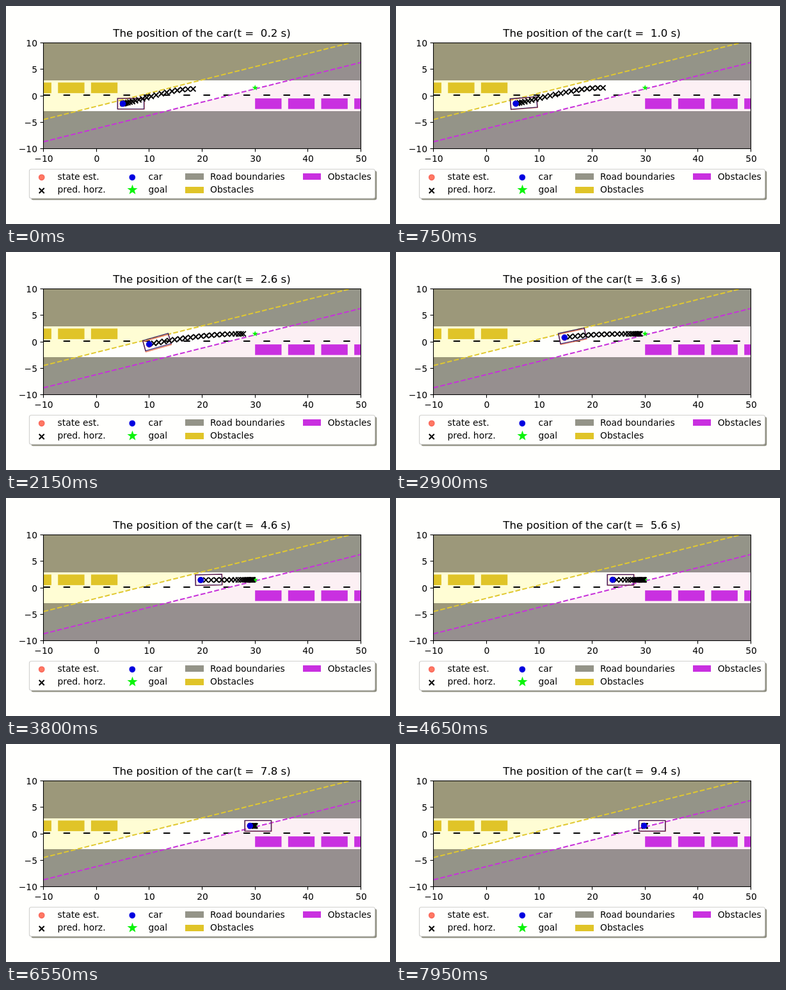
An HTML page with a canvas that plays this animation: 600 by 340 pixels, repeating every 8 s.

```html
<!DOCTYPE html>
<html lang="en">
<head>
<meta charset="utf-8">
<title>Position of the car</title>
<style>
  html, body { margin: 0; width: 100%; height: 100%; overflow: hidden; background: #fffffd; }
  canvas { display: block; }
</style>
</head>
<body>
<canvas id="stage" width="600" height="340"></canvas>
<script>
const ctx = document.getElementById('stage').getContext('2d');
const LOOP = 8000, TICK = 50, HOLD = 170, DT = 0.2, HORIZON = 20;
const LEFT = 58.5, MID = 140, SCALE_X = 8.267, SCALE_Y = 8.25;
const GOAL = 30, LANE = 1.5, CRUISE = 5, ROAD_EDGE = 2.91;
const BLUE = '#0000e0', CORAL = '#ff7862', GREEN = '#08f408';
const YELLOW = '#e0c428', MAGENTA = '#c930e0', ROAD = '#949488', PAPER = '#fffffd';

const px = x => LEFT + (x + 10) * SCALE_X;
const py = y => MID - y * SCALE_Y;
const upperLine = x => 0.25 * x - 2;
const lowerLine = x => 0.25 * x - 6.2;

// Cubic Hermite curve through knots [u, value, slope].
function curve(knots, u) {
  if (u <= knots[0][0]) return knots[0][1];
  for (let i = 1; i < knots.length; i++) {
    const [a, p, m] = knots[i - 1], [b, q, n] = knots[i];
    if (u > b) continue;
    const w = b - a, s = (u - a) / w, r = 1 - s;
    return p * (1 + 2 * s) * r * r + m * w * s * r * r + q * s * s * (3 - 2 * s) - n * w * s * s * r;
  }
  return knots[knots.length - 1][1];
}
const lateral = x => curve([[5, -1.5, 0], [7.25, -1.25, 0.24], [14.75, 0.8, 0.17], [21, LANE, 0]], x);
const heading = x => curve([[5, 0, 0.15], [7.25, 0.23, 0.03], [14.75, 0.21, -0.03], [21.5, 0, 0]], x);

// States after each time step: accelerate to cruising speed, then brake into the goal.
function drive(x, v, accel, braking, steps) {
  const states = [{ x, v }], h = DT / 10;
  for (let i = 1; i <= steps; i++) {
    for (let k = 0; k < 10; k++) {
      v = Math.min(CRUISE, v + accel * h, braking(Math.max(0, GOAL - x)));
      x += v * h;
    }
    states.push({ x, v });
  }
  return states;
}
const track = drive(5, 0, 1.72, rest => Math.min(1.45 * Math.sqrt(rest), rest), 50);

function predict({ x, v }) {
  const plan = drive(x, v, 1.85, rest => 0.85 * rest, HORIZON).slice(1);
  const y = lateral(x), end = plan[HORIZON - 1].x;
  const slope = 0.2 * Math.min(1, LANE - y);
  const target = Math.min(LANE, -1.5 + 0.21 * (end - 5));
  return plan.map(p => [p.x, curve([[x, y, slope], [end, target, 0]], p.x)]);
}

function fillRect(x0, y0, x1, y1, color) {
  ctx.fillStyle = color;
  ctx.fillRect(x0, y0, x1 - x0, y1 - y0);
}

function polygon(points) {
  ctx.beginPath();
  points.forEach(([x, y]) => ctx.lineTo(x, y));
  ctx.closePath();
}

function line(x0, y0, x1, y1, color, width, dash = []) {
  ctx.strokeStyle = color;
  ctx.lineWidth = width;
  ctx.setLineDash(dash);
  ctx.beginPath();
  ctx.moveTo(x0, y0);
  ctx.lineTo(x1, y1);
  ctx.stroke();
  ctx.setLineDash([]);
}

function text(str, x, y, align = 'left', size = 13.89) {
  ctx.font = size + 'px "DejaVu Sans", sans-serif';
  ctx.textAlign = align;
  ctx.fillStyle = '#000';
  ctx.fillText(str, x, y);
}

function dot(x, y, fill, edge) {
  ctx.beginPath();
  ctx.arc(x, y, 4.2, 0, 7);
  ctx.fillStyle = fill;
  ctx.fill();
  ctx.strokeStyle = edge;
  ctx.lineWidth = 1.3;
  ctx.stroke();
}

function cross(x, y) {
  line(x - 4, y - 4, x + 4, y + 4, '#000', 2);
  line(x - 4, y + 4, x + 4, y - 4, '#000', 2);
}

function star(x, y, radius) {
  polygon(Array.from({ length: 10 }, (_, i) => {
    const r = i % 2 ? radius * 0.4 : radius, a = i * Math.PI / 5;
    return [x + r * Math.sin(a), y - r * Math.cos(a)];
  }));
  ctx.fillStyle = GREEN;
  ctx.fill();
}

function carBox(x, y, angle, color, width) {
  const c = Math.cos(angle), s = Math.sin(angle);
  polygon([[-1, -1], [4, -1], [4, 1], [-1, 1]].map(([a, b]) =>
    [px(x + a * c - b * s), py(y + a * s + b * c)]));
  ctx.strokeStyle = color;
  ctx.lineWidth = width;
  ctx.stroke();
}

function clipBand(top, bottom) {
  ctx.save();
  ctx.beginPath();
  ctx.rect(px(-10), py(top), 60 * SCALE_X, (top - bottom) * SCALE_Y);
  ctx.clip();
}

// Horizontal strip, tinted above the upper line and below the lower one.
function strip(top, bottom, above, between, below) {
  clipBand(top, bottom);
  fillRect(0, 0, 600, 340, between);
  [[upperLine, 20, above], [lowerLine, -20, below]].forEach(([f, far, color]) => {
    polygon([[-10, f(-10)], [50, f(50)], [50, far], [-10, far]].map(([x, y]) => [px(x), py(y)]));
    ctx.fillStyle = color;
    ctx.fill();
  });
  ctx.restore();
}

function drawRoad() {
  const shoulder = ['#9c987a', '#949488', '#968f8f'];
  strip(10, ROAD_EDGE, ...shoulder);
  strip(ROAD_EDGE, -ROAD_EDGE, '#fffdd4', PAPER, '#fcf0f4');
  strip(-ROAD_EDGE, -10, ...shoulder);
  clipBand(10, -10);
  for (let i = 0; i < 4; i++) {
    const back = 4 - i * 6.25, front = 30 + i * 6.25;
    fillRect(px(back - 5), py(2.5), px(back), py(0.5), YELLOW);
    fillRect(px(front), py(-0.5), px(front + 5), py(-2.5), MAGENTA);
  }
  line(px(-10), 139, px(50), 139, '#000', 2, [10.4, 20.85]);
  line(px(-10), py(upperLine(-10)), px(50), py(upperLine(50)), '#e0c830', 2, [7.7, 3.3]);
  line(px(-10), py(lowerLine(-10)), px(50), py(lowerLine(50)), '#c732da', 2, [7.7, 3.3]);
  ctx.restore();
}

function drawAxes() {
  ctx.strokeStyle = '#000';
  ctx.lineWidth = 1.1;
  ctx.strokeRect(58.5, 57.5, 496, 165);
  const label = v => String(v).replace('-', '\u2212');
  for (let x = -10; x <= 50; x += 10) {
    const at = Math.floor(px(x)) + 0.5;
    line(at, 222.5, at, 227.5, '#000', 1.1);
    text(label(x), at + 0.5, 243, 'center');
  }
  for (let y = -10; y <= 10; y += 5) {
    const at = Math.floor(py(y)) + 0.5;
    line(53.5, at, 58.5, at, '#000', 1.1);
    text(label(y), 49, at + 5, 'right');
  }
}

function drawLegend() {
  const panel = (x, y, color) => {
    ctx.beginPath();
    ctx.roundRect(x, y, 540, 45.5, 3);
    ctx.fillStyle = color;
    ctx.fill();
  };
  panel(39.3, 257, '#8c8c7e');
  panel(36.5, 254.5, PAPER);
  ctx.strokeStyle = '#d2d2d0';
  ctx.lineWidth = 1.2;
  ctx.stroke();
  dot(55.7, 267.3, CORAL, '#f86458');
  cross(55.7, 288);
  dot(197.3, 267.3, BLUE, BLUE);
  star(197.5, 286.8, 8.4);
  fillRect(280, 261, 309, 271, ROAD);
  fillRect(280, 282, 309, 292, YELLOW);
  fillRect(464, 261, 492, 271, MAGENTA);
  text('state est.', 80.5, 270.5);
  text('pred. horz.', 80.5, 291);
  text('car', 222.5, 270.5);
  text('goal', 222.5, 291);
  text('Road boundaries', 319, 270.5);
  text('Obstacles', 319, 291);
  text('Obstacles', 502.7, 270.5);
}

function drawCar(state) {
  const x = state.x, y = lateral(x), angle = heading(x);
  const drift = -0.7 * angle;
  carBox(x + 0.05, y + drift, angle, '#f08060', 1.5);
  carBox(x, y, angle, 'rgba(20, 0, 90, 0.8)', 1.4);
  dot(px(x), py(y + drift * 0.3), CORAL, CORAL);
  star(px(GOAL), py(LANE), 4.8);
  predict(state).forEach(([u, v]) => cross(px(u), py(v)));
  dot(px(x), py(y), BLUE, BLUE);
}

function render(now) {
  const time = Math.floor((now % LOOP) / TICK) * TICK;
  const step = Math.floor((time + TICK / 2) / HOLD);
  fillRect(0, 0, 600, 340, PAPER);
  drawRoad();
  drawCar(track[step]);
  drawAxes();
  drawLegend();
  const clock = ((step + 1) * DT).toFixed(1).padStart(4);
  text(`The position of the car(t = ${clock} s)`, 306, 48, 'center', 16.67);
}

const start = performance.now();
function loop() {
  render(performance.now() - start);
  requestAnimationFrame(loop);
}
loop();
</script>
</body>
</html>
```
